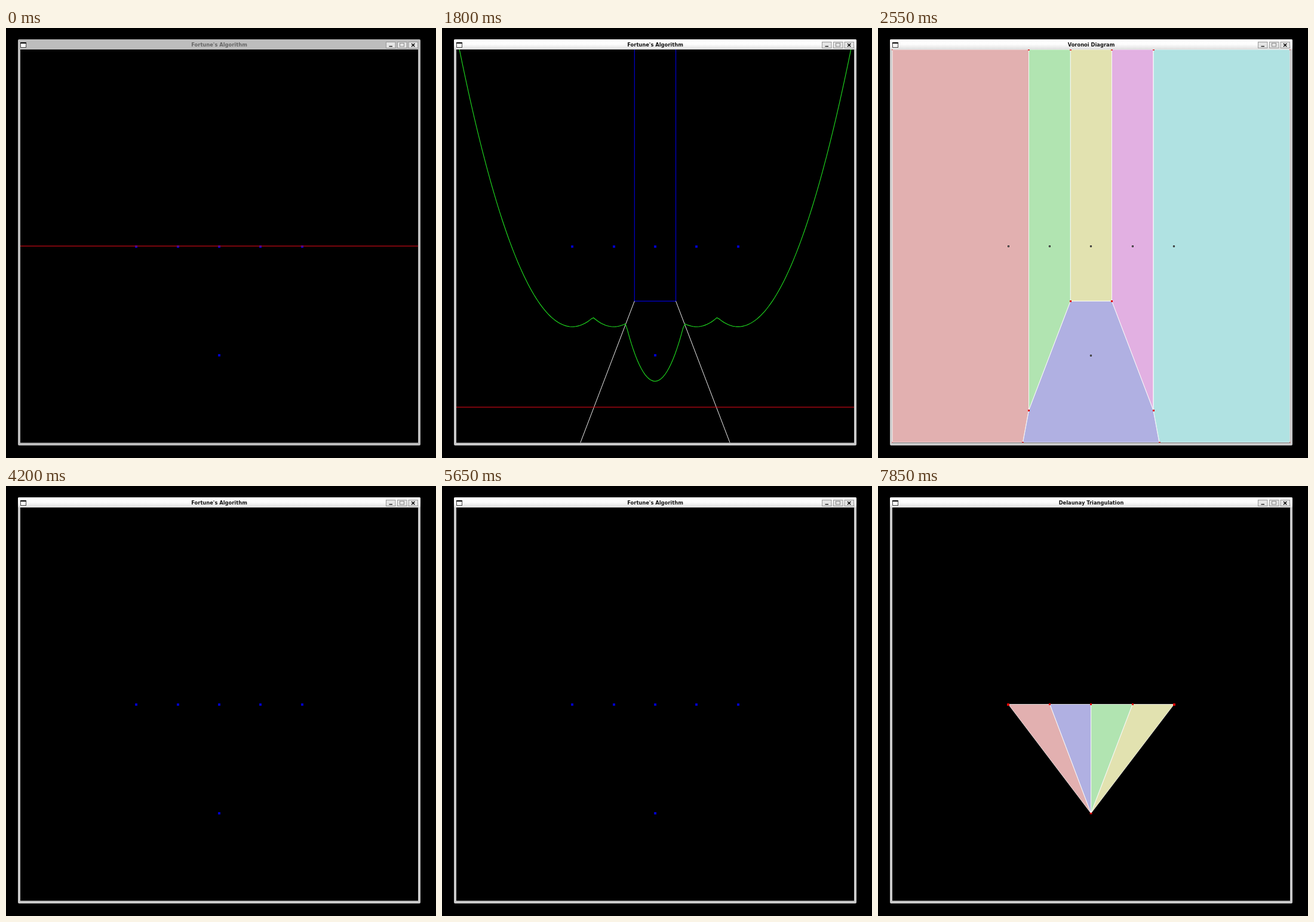
Recreate the animation shown at these times as an HTML page with a canvas. Size 720 px wide and 720 px high, loop 8000 ms.

```html
<!DOCTYPE html>
<html lang="en">
<head>
<meta charset="utf-8">
<title>Fortune's Algorithm</title>
<style>
  html, body { margin: 0; width: 100%; height: 100%; overflow: hidden; background: #000; }
  canvas { display: block; width: 720px; height: 720px; }
</style>
</head>
<body>
<canvas id="stage" width="720" height="720"></canvas>
<script>
const ctx = document.getElementById('stage').getContext('2d');
const LOOP = 8000, STEP = 50;
const VIEW = { left: 24, top: 36, right: 690, bottom: 694.5 };
const ROW = 365.5, LOW = 548;
const SITES = [218.2, 287.7, 356.6, 426.2, 495.7].map(x => [x, ROW]).concat([[356.6, LOW]]);
const STRETCH = 7; // squared horizontal scale of the distance metric
const PINK = '#e2b0b0', GREEN = '#b1e4b1', YELLOW = '#e2e2b0',
      VIOLET = '#e2b0e2', CYAN = '#b0e2e2', BLUE = '#b0b0e2';

// Cell corners
const [A, B, C, D] = [252.5, 322.3, 391.5, 461];
const MID = 457.3, DEEP = 640, FOOT_L = 242.5, FOOT_R = 471;
const { left, top: ceil, right, bottom } = VIEW;
const floor = 694;
const CELLS = [
  [PINK, [[left, ceil], [A, ceil], [A, DEEP], [FOOT_L, floor], [left, floor]]],
  [GREEN, [[A, ceil], [B, ceil], [B, MID], [A, DEEP]]],
  [YELLOW, [[B, ceil], [C, ceil], [C, MID], [B, MID]]],
  [VIOLET, [[C, ceil], [D, ceil], [D, DEEP], [C, MID]]],
  [CYAN, [[D, ceil], [right - .5, ceil], [right - .5, floor], [FOOT_R, floor], [D, DEEP]]],
  [BLUE, [[B, MID], [C, MID], [D, DEEP], [FOOT_R, floor], [FOOT_L, floor], [A, DEEP]]]
];
const TRIANGLES = [PINK, BLUE, GREEN, YELLOW].map((color, i) => [color, [SITES[i], SITES[i + 1], SITES[5]]]);

// [start, scene]
const TIMELINE = [
  [0, 'sweep'], [2250, 'sites'], [2350, 'voronoiTitle'], [2450, 'cells'], [2550, 'voronoi'],
  [4200, 'sites'], [4250, 'delaunayTitle'], [4350, 'delaunay'],
  [4650, 'sites'], [4750, 'voronoiTitle'], [4850, 'cells'], [4950, 'voronoi'],
  [5650, 'sites'], [5750, 'delaunayTitle'], [5850, 'delaunay'],
  [6050, 'sites'], [6150, 'voronoiTitle'], [6250, 'cells'], [6350, 'voronoi'],
  [6650, 'sites'], [6850, 'delaunayTitle'], [7050, 'delaunay']
];

function rect(color, x, y, w, h) {
  ctx.fillStyle = color;
  ctx.fillRect(x, y, w, h);
}

function dot(color, [x, y], size = 4) {
  rect(color, Math.round(x - size / 2), Math.round(y - size / 2), size, size);
}

function path(points, color, width = 1) {
  ctx.beginPath();
  points.forEach(([x, y]) => ctx.lineTo(x, y));
  ctx.strokeStyle = color;
  ctx.lineWidth = width;
  ctx.stroke();
}

function fillShapes(shapes) {
  for (const [color, points] of shapes) {
    ctx.beginPath();
    points.forEach(([x, y]) => ctx.lineTo(x, y));
    ctx.closePath();
    ctx.fillStyle = color;
    ctx.fill();
  }
  for (const [, points] of shapes) path([...points, points[0]], 'rgba(255,255,255,.75)');
}

function drawWindow(title, active) {
  rect('#000', 0, 0, 720, 720);
  ctx.fillStyle = active ? '#cacaca' : '#bdbdbd';
  ctx.beginPath();
  ctx.roundRect(20, 19, 674, 680, 2);
  ctx.fill();
  if (active) {
    const shade = ctx.createLinearGradient(0, 19, 0, 36);
    shade.addColorStop(0, '#fff');
    shade.addColorStop(.5, '#fcfcfc');
    shade.addColorStop(1, '#dedede');
    ctx.fillStyle = shade;
    ctx.beginPath();
    ctx.roundRect(20, 19, 674, 17, 2);
    ctx.fill();
  }
  ctx.font = 'bold 8.33px "DejaVu Sans", sans-serif';
  ctx.textAlign = 'center';
  ctx.fillStyle = active ? '#111' : '#666';
  ctx.fillText(title, 357, 31);

  rect('#444', 24, 24, 10, 9);
  rect('#000', 24, 24, 10, 2);
  rect('#fff', 25, 26, 8, 6);

  for (const x of [636, 655, 673.5]) {
    rect('#999', x, 23, 16.5, 11);
    rect('#e4e4e4', x + 1, 24, 14.5, 9);
  }
  rect('#111', 641.5, 30, 5.5, 1.3);
  ctx.strokeStyle = '#888';
  ctx.lineWidth = 1;
  ctx.strokeRect(659.5, 25.5, 7, 5.5);
  path([[679, 26], [684.3, 31.3]], '#000', 1.3);
  path([[684.3, 26], [679, 31.3]], '#000', 1.3);
  rect('#000', left, ceil, right - left, bottom - ceil);
}

// Screen y of the beach line: the lowest of all parabolas.
function beachY(x, sweep) {
  return Math.max(...SITES.filter(s => s[1] < sweep - .5).map(([sx, sy]) =>
    (sy + sweep) / 2 - STRETCH * (x - sx) ** 2 / (2 * (sweep - sy))));
}

function eventY(x, y) {
  const [sx, sy] = SITES.reduce((a, b) =>
    STRETCH * (a[0] - x) ** 2 + (a[1] - y) ** 2 < STRETCH * (b[0] - x) ** 2 + (b[1] - y) ** 2 ? a : b);
  return y + Math.sqrt(STRETCH * (sx - x) ** 2 + (sy - y) ** 2);
}

function drawSweep(time) {
  const count = Math.max(0, Math.floor((time - 1000) / STEP));
  const sweep = count ? 480.8 + 17.12 * (count - 7) : 365.2;
  SITES.forEach(s => dot('#0000c8', s));

  if (sweep > eventY(B, MID)) {
    path([[B, ceil], [B, MID], [C, MID], [C, ceil]], '#0000d0', 1.2);
    const reach = (bottom - MID) * (B - A) / (DEEP - MID);
    path([[B, MID], [B - reach, bottom]], '#eee');
    path([[C, MID], [C + reach, bottom]], '#eee');
  }
  if (count) {
    const curve = [];
    for (let i = 0; i <= 200; i++) {
      const x = left + (right - left) * i / 200;
      curve.push([x, beachY(x, sweep)]);
    }
    path(curve, '#20e020', 1.1);
  }
  path([[left, sweep], [right, sweep]], 'rgba(225,10,25,.85)', 1.2);
}

function drawVoronoi(finished) {
  fillShapes(CELLS);
  for (const [x, y] of SITES) {
    dot('#222', [x, y], 3);
    rect('#ddd', Math.round(x - 1.5) + 1, Math.round(y - 1.5) + 1, 1, 1);
  }
  if (!finished) return;
  for (const p of [[A, DEEP], [B, MID], [C, MID], [D, DEEP]]) dot('#e00000', p, 3);
  for (const x of [A, B, C, D]) rect('#e01010', Math.round(x - 1.5), 36, 3, 1.5);
  for (const x of [FOOT_L, FOOT_R]) rect('#e01010', Math.round(x - 1.5), 693, 3, 1.5);
  for (const x of [23, 689]) {
    rect('#e01010', x, 36, 1.5, 1);
    rect('#e01010', x, 693.5, 1.5, 1);
  }
}

function drawDelaunay() {
  fillShapes(TRIANGLES);
  SITES.forEach(([x, y], i) => i < 5 ? dot('#e00000', [x, y], i % 4 ? 3 : 4)
                                      : rect('#e00000', x - 2, y - 1, 4, 2.5));
}

function draw(time) {
  const scene = TIMELINE.findLast(([start]) => time >= start)[1];
  const title = /^(voronoi|cells)/.test(scene) ? 'Voronoi Diagram'
    : scene.startsWith('delaunay') ? 'Delaunay Triangulation' : "Fortune's Algorithm";
  drawWindow(title, time >= 550);
  ctx.save();
  ctx.beginPath();
  ctx.rect(23, ceil, 668, bottom - ceil);
  ctx.clip();
  if (scene === 'sweep') drawSweep(time);
  else if (scene === 'cells' || scene === 'voronoi') drawVoronoi(scene === 'voronoi');
  else if (scene === 'delaunay') drawDelaunay();
  else SITES.forEach(s => dot('#0000c8', s));
  ctx.restore();
}

const begin = performance.now();
function tick() {
  draw((performance.now() - begin) % LOOP);
  requestAnimationFrame(tick);
}
tick();
</script>
</body>
</html>
```
